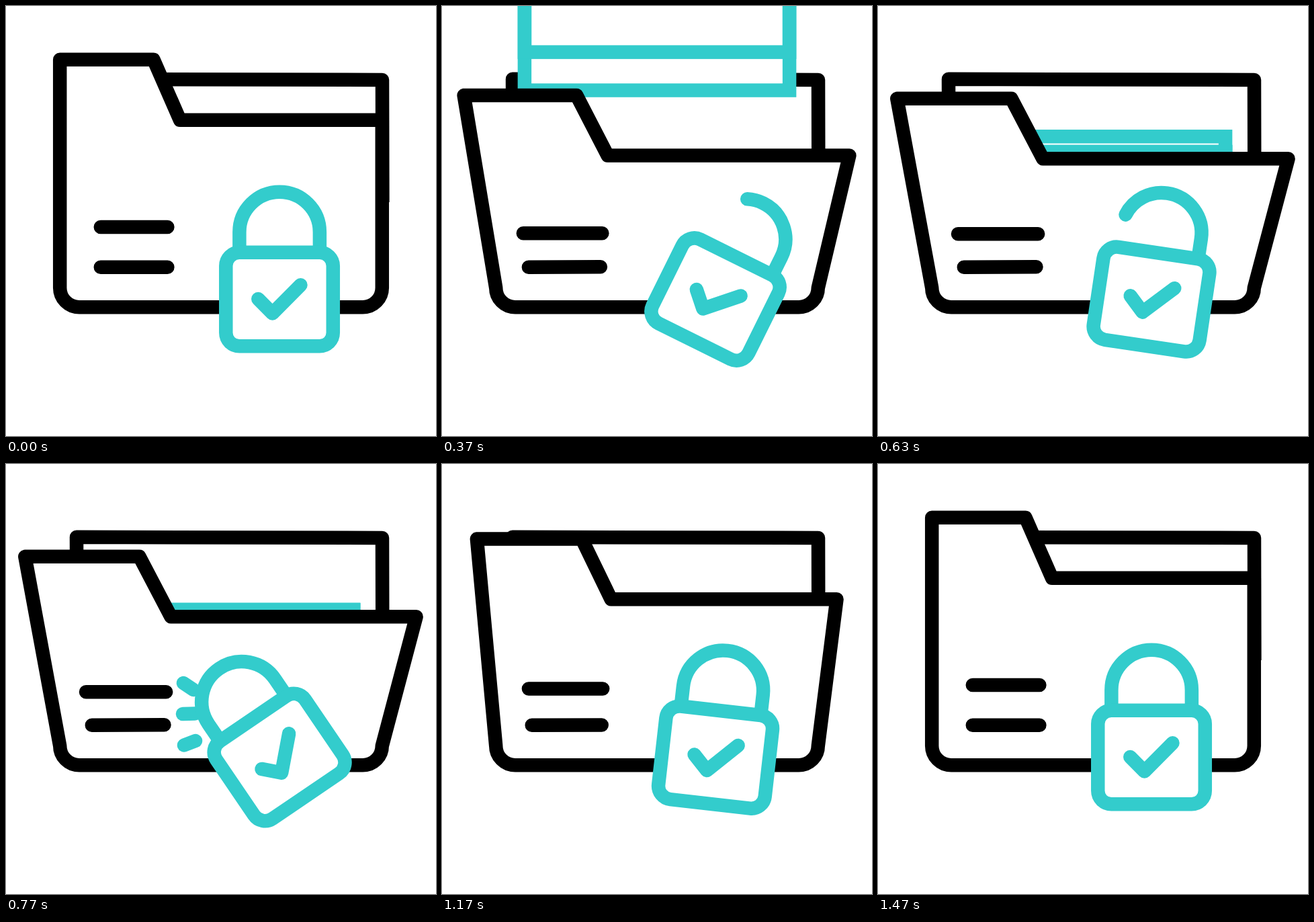
Animation, 640 px wide and 640 px high, one loop 1.67 s. Source, as an HTML page:

```html
<!DOCTYPE html>
<html lang="en">
<head>
<meta charset="utf-8">
<title>Secure folder</title>
<style>
  html, body { margin: 0; width: 100%; height: 100%; overflow: hidden; background: #fff; }
  svg { display: block; width: 100vw; height: 100vh; }
  .ink, .teal { stroke-width: 20.5; stroke-linejoin: round; fill: none; }
  .ink { stroke: #000; }
  .teal { stroke: #3cc; }
  .round { stroke-linecap: round; }
  .white { fill: #fff; }
</style>
</head>
<body>
<svg viewBox="0 0 640 640">
  <path class="ink white" d="M105.6 292 L105 108.8 L560 110 L560.4 292"/>
  <g id="fills" class="white"></g>
  <g id="edges" class="teal" style="stroke-linejoin:miter"></g>
  <path id="front" class="ink white"/>
  <path id="notes" class="ink round"/>
  <path id="sparks" class="teal round"/>
  <g id="lock">
    <path id="shackle" class="teal round" pathLength="100"
      d="M466.9 366.8 V336.6 A59.75 59.75 0 0 0 347.4 336.6 V366.8"/>
    <rect class="teal white" x="327.3" y="366.8" width="159.5" height="139.5" rx="20"/>
    <path class="teal round" d="M375.3 436 L396.6 457.4 L438.5 415.3"/>
  </g>
</svg>
<script>
const LOOP = 1670, STEP = 100 / 3;
const SHEET_H = 136, SHEET_TOP = -147, SHEET_REST = 217, FALL = 8;
const DROPS = [8, 9.25, 11.5];

// Keys are [step, value] pairs joined by straight lines.
const OPEN = [[0, 0], [12, 1], [30, 1], [41, 0]];
const TILT = [[3.85, 0], [14.8, 40.4], [16, 40.4], [23, -34.2], [30, 22.6], [40, -9.7], [44, 0]];
const TRIM = [[3.85, 0], [9.15, 40], [16, 40], [22, 0]];
const HEAD = [[20, 0], [23, 1]];
const TAIL = [[23, 0], [26, 1]];
const SPARKS = [[279, 336, 264, 326], [281, 371.4, 263, 372], [282, 412, 265, 418.5]];

const $ = id => document.getElementById(id);
const mix = (a, b, p) => a + (b - a) * p;

function track(keys, s) {
  if (s <= keys[0][0]) return keys[0][1];
  for (let i = 1; i < keys.length; i++) {
    const [s0, v0] = keys[i - 1], [s1, v1] = keys[i];
    if (s <= s1) return mix(v0, v1, (s - s0) / (s1 - s0));
  }
  return keys[keys.length - 1][1];
}

function addSheet(parent) {
  const r = document.createElementNS("http://www.w3.org/2000/svg", "rect");
  r.setAttribute("x", 122.9);
  r.setAttribute("width", 394.2);
  r.setAttribute("height", SHEET_H);
  parent.appendChild(r);
  return r;
}
const sheets = DROPS.map(start => ({ start, parts: [addSheet($("fills")), addSheet($("edges"))] }));

function drawFolder(p) {
  const m = (a, b) => mix(a, b, p).toFixed(2);
  const top = m(79.8, 137.8), lip = m(169.8, 227.3);
  $("front").setAttribute("d",
    `M${m(80.2, 28.3)} ${top} H${m(219.6, 198.5)} L${m(259, 245.4)} ${lip} H${m(559.8, 610.6)}` +
    " L559.8 419.5 A28.8 28.8 0 0 1 531 448.3 H109 A28.8 28.8 0 0 1 80.2 419.5 Z");
  $("notes").setAttribute("d",
    `M${m(140.8, 119)} ${m(329, 339.2)} H${m(240.4, 238.2)}` +
    `M${m(140.8, 127.8)} 388.7 L${m(240.4, 235.5)} ${m(388.7, 388.2)}`);
}

function drawSparks(s) {
  const head = track(HEAD, s), tail = track(TAIL, s);
  const at = ([x0, y0, x1, y1], p) => `${mix(x0, x1, p)} ${mix(y0, y1, p)}`;
  $("sparks").setAttribute("d", head > tail
    ? SPARKS.map(k => `M${at(k, tail)} L${at(k, head)}`).join("") : "");
}

function draw(ms) {
  const s = Math.floor((ms % LOOP + 5) / STEP);
  drawFolder(track(OPEN, s));
  for (const { start, parts } of sheets) {
    const y = track([[start, SHEET_TOP], [start + FALL, SHEET_REST]], s);
    parts.forEach(r => r.setAttribute("y", y));
  }
  drawSparks(s);
  $("lock").setAttribute("transform", `rotate(${track(TILT, s)} 407.05 436.5)`);
  $("shackle").setAttribute("stroke-dasharray", `${100 - track(TRIM, s)} 200`);
}

const begin = performance.now();
function tick() {
  draw(performance.now() - begin);
  requestAnimationFrame(tick);
}
tick();
</script>
</body>
</html>
```
